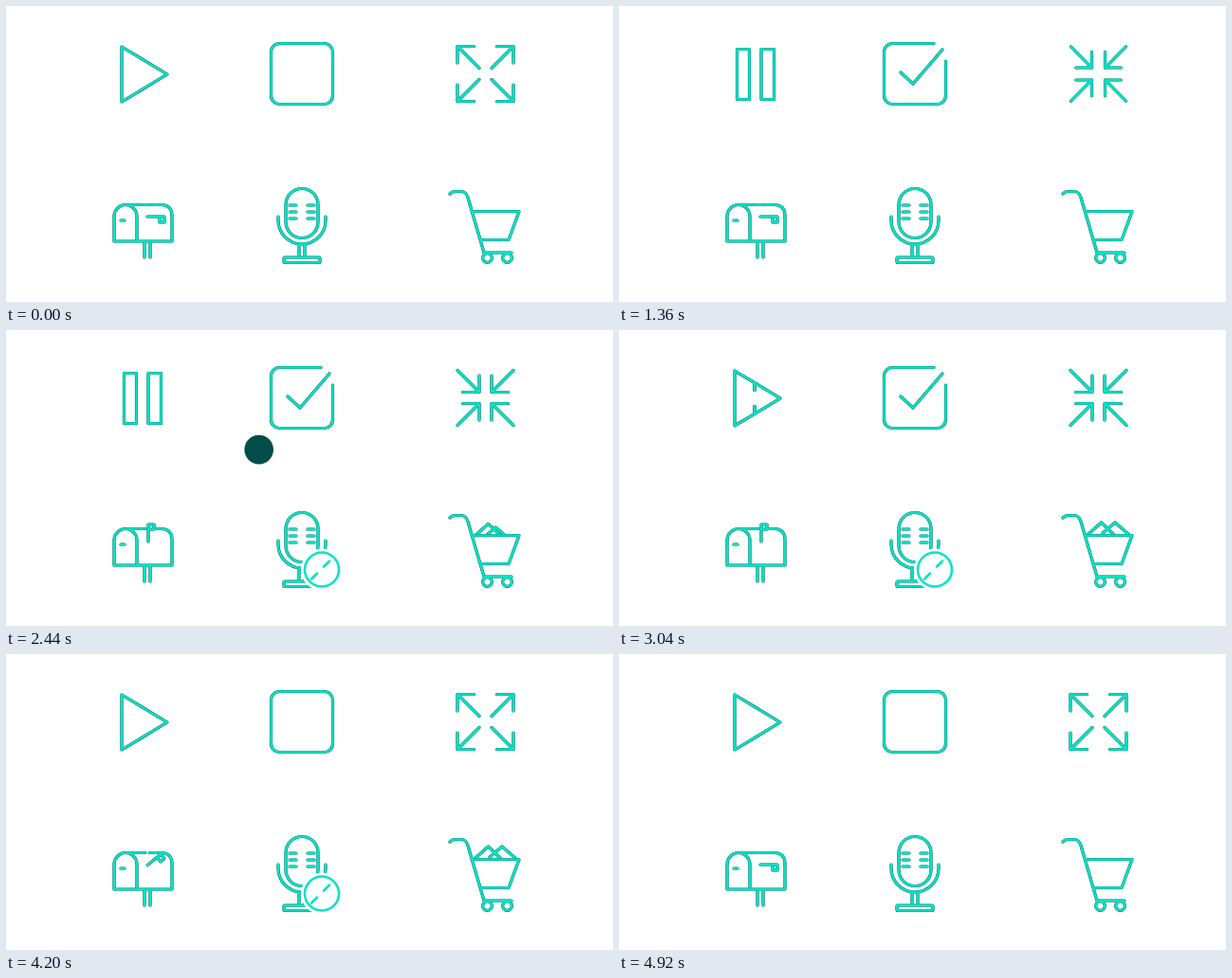
These frames come from a looping animation (640x312 px, 5200 ms). An HTML page:

```html
<!DOCTYPE html>
<html lang="en">
<head>
<meta charset="utf-8">
<title>Toggle icons</title>
<style>
  html, body { margin: 0; width: 100%; height: 100%; overflow: hidden; background: #fff; }
  svg { display: block; width: 100%; height: 100%; }
  #icons { fill: none; stroke-linecap: round; stroke-linejoin: round; }
  #arrows path { vector-effect: non-scaling-stroke; }
</style>
</head>
<body>
<svg viewBox="0 0 640 312">
  <defs>
    <clipPath id="aboveBasket"><path d="M480 190H560V215H480Z"/></clipPath>
    <g id="icons">
      <path id="playLeft"/>
      <path id="playRight"/>

      <path d="M332 39.5H288.500a9 9 0 0 0-9 9V94.500a9 9 0 0 0 9 9H335.500a9 9 0 0 0 9-9V58"/>
      <path id="boxCorner" pathLength="1" d="M332 39.500H335.500a9 9 0 0 1 9 9V58"/>
      <path id="tick" pathLength="1" d="M297 70L310 82L341 46"/>

      <g id="arrows"></g>

      <path d="M114 248V221.500a12 12 0 0 1 24 0V248M126 209.500H147M157 209.500H164Q175 210 175 221V248H114M146 249V265M152 249V265M121 226H125"/>
      <path id="lidGap" pathLength="1" d="M157 209.500H147"/>
      <path id="flag" d="M-1 0H17V6H12V1"/>

      <rect x="295" y="192.500" width="34" height="52" rx="17"/>
      <path d="M299 210H306M299 217H306M299 224H306M318 210H325M318 217H325M318 224H325M287 222V226a25 25 0 0 0 50 0V222M309 252V264M315 252V264"/>
      <rect x="293" y="265" width="38" height="5.500" rx="1"/>
      <g id="mute">
        <circle r="22" fill="#fff" stroke="none"/>
        <circle r="18"/>
        <path d="M8 -9L2 -3M-5 4L-11 10"/>
      </g>

      <path d="M468 198Q470 195.500 474 195.500H480Q485 195.500 487 202L504 260H533M492 216.500H541L530 246.500H500"/>
      <circle cx="507.500" cy="265.500" r="4.800"/>
      <circle cx="528.500" cy="265.500" r="4.800"/>
      <g id="goods" clip-path="url(#aboveBasket)">
        <path id="goodsLeft" d="M495 215L508.500 203L521 215"/>
        <path id="goodsRight" d="M510 214L523 203L537 215"/>
      </g>
    </g>
  </defs>
  <circle id="pointer" fill="#004d4a"/>
  <use href="#icons" stroke="#00574f" stroke-width="3.200"/>
  <use href="#icons" stroke="#06e3c6" stroke-width="2.500"/>
</svg>
<script>
const LOOP = 5200, FIRST_TAP = 280, TAP_GAP = 400, ICONS = 6;
const centers = [[145, 72], [312, 72], [505, 72], [145, 232], [312, 232], [505, 232]];
const durations = [400, 400, 310, 600, 350, 240];

const el = id => document.getElementById(id);
const set = (id, name, value) => el(id).setAttribute(name, value);
const clamp = x => Math.max(0, Math.min(1, x));
const ease = x => (1 - Math.cos(Math.PI * clamp(x))) / 2;
const mix = (a, b, k) => a + (b - a) * k;

// One arrow shape, mirrored into the four corners.
const arrows = [[-1, -1], [1, -1], [-1, 1], [1, 1]].map(([sx, sy]) => {
  const path = document.createElementNS('http://www.w3.org/2000/svg', 'path');
  path.setAttribute('d', 'M-11.500 -11.500L11.500 11.500M-6 11.500H11.500V-6');
  el('arrows').append(path);
  return { path, sx, sy };
});

// Linear progress of an icon from its off state (0) to its on state (1).
function state(icon, t) {
  const on = FIRST_TAP + TAP_GAP * icon;
  const off = on + TAP_GAP * ICONS;
  return clamp((t - on) / durations[icon]) - clamp((t - off) / durations[icon]);
}

function trace(id, part) {
  set(id, 'stroke-dasharray', `${part} 2`);
  set(id, 'opacity', part > 0.001 ? 1 : 0);
}

function drawPlay(s) {
  const k = ease((s - 0.05) / 0.95);
  const open = 1 - clamp(s / 0.2);
  const half = (outer, inner, outerHalf, innerHalf) => {
    const gap = innerHalf * open;
    return `M${inner} ${72 - gap}V${72 - innerHalf}L${outer} ${72 - outerHalf}` +
      `V${72 + outerHalf}L${inner} ${72 + innerHalf}V${72 + gap}`;
  };
  set('playLeft', 'd', half(mix(122, 124.5, k), mix(143, 137.5, k), mix(29, 26.5, k), mix(16.3, 26.5, k)));
  set('playRight', 'd', half(mix(170, 163.5, k), mix(143, 150, k), mix(0, 26.5, k), mix(16.3, 26.5, k)));
}

function drawPointer(t) {
  const step = Math.floor((t - FIRST_TAP) / TAP_GAP);
  const p = (t - FIRST_TAP - step * TAP_GAP - 40) / 200;
  const flying = step >= 0 && step < 2 * ICONS && p > 0 && p < 1;
  set('pointer', 'r', flying ? 15.3 * Math.min(1, 8 * p, 8 * (1 - p)) : 0);
  if (!flying) return;
  const from = centers[step % ICONS];
  const to = step === 2 * ICONS - 1 ? [609, 232] : centers[(step + 1) % ICONS];
  set('pointer', 'cx', mix(from[0], to[0], ease(p)));
  set('pointer', 'cy', mix(from[1], to[1], ease(p)));
}

function draw(now) {
  const t = now % LOOP;
  const [play, check, resize, mail, mic, cart] = centers.map((_, i) => state(i, t));

  drawPlay(play);

  trace('tick', ease(check));
  trace('boxCorner', 1 - ease(check));

  const flip = -Math.cos(Math.PI * resize);
  for (const { path, sx, sy } of arrows) {
    path.setAttribute('transform',
      `translate(${505.5 + sx * 18} ${71.5 + sy * 17.5}) scale(${-sx * flip} ${-sy * flip})`);
  }

  set('flag', 'transform', `translate(150 222) rotate(${-90 * ease(mail)})`);
  trace('lidGap', 1 - ease(mail));

  set('mute', 'transform', `translate(333 252.5) scale(${ease(mic)})`);
  set('mute', 'opacity', mic > 0 ? 1 : 0);

  const left = ease(cart * 1.2), right = ease(cart * 1.2 - 0.2);
  set('goods', 'opacity', cart > 0 ? 1 : 0);
  set('goodsLeft', 'transform', `translate(0 ${15 * (1 - left)})`);
  set('goodsRight', 'transform', `translate(${-20 * (1 - right)} ${15 * (1 - right)})`);

  drawPointer(t);
  requestAnimationFrame(draw);
}
requestAnimationFrame(draw);
</script>
</body>
</html>
```
